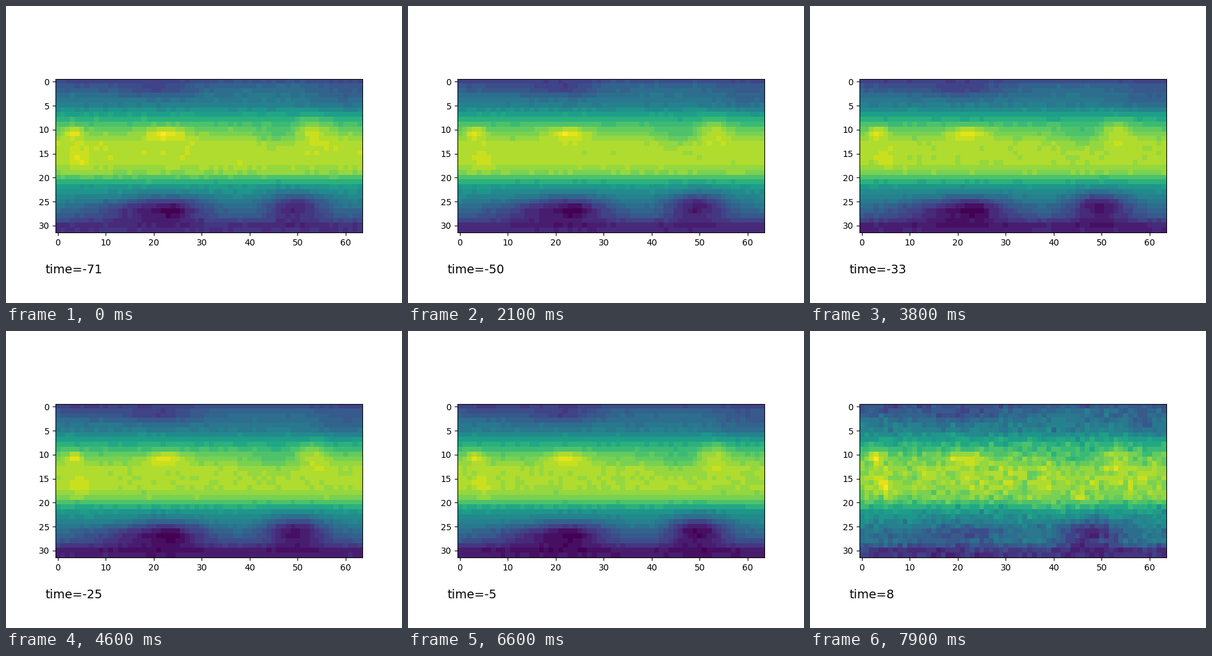
These frames come from a looping animation (640 px wide and 480 px high, 8 s). A matplotlib script:

```python
import numpy as np
import matplotlib.pyplot as plt
from matplotlib.animation import FuncAnimation

ROWS, COLS = 32, 64
FRAMES, STEP_MS, T0 = 80, 100, -71

rng = np.random.default_rng(12)
yy, xx = np.mgrid[0:ROWS, 0:COLS].astype(float)


def bump(cx, cy, sx, sy):
    return np.exp(-((xx - cx) / sx) ** 2 / 2 - ((yy - cy) / sy) ** 2 / 2)


def ramp(x, a, b):
    return np.clip((x - a) / (b - a), 0, 1)


# latitude profile: cool north, warm belt, cool south, polar edge
zonal = np.interp(yy, [0, 1, 5, 8, 10, 13, 17, 19, 22, 25, 28, 30],
                  [.27, .35, .44, .64, .76, .87, .87, .81, .55, .43, .31, .16])

north_cold = .15 * bump(21, 1.7, 6, 1.3) + .08 * bump(5, 1, 6, 1.3) + .08 * bump(60, 3, 5, 2.5)
hot_spots = .16 * bump(3.3, 10.8, 1.3, 1) + .17 * bump(22.5, 10.9, 3, 1) + .06 * bump(5, 16.5, 1.5, 1.5)
ridge = .12 * bump(53, 10, 2.3, 2) - .08 * bump(46, 11.5, 3.5, 1.6)
base = zonal - north_cold + hot_spots + ridge

west_low = .27 * bump(23, 26.4, 6, 2) + .10 * bump(13, 27, 6, 1.6)
west_core = .09 * bump(24, 27, 1.5, .8)
east_low = .27 * bump(49.5, 25.8, 4.5, 2.1)
polar = ramp(yy, 27, 30)

# the forecast moves the eastern low and warms its surroundings
moved_low = .31 * bump(47.5, 26.5, 4.5, 2.2)
thaw = .09 * bump(32, 28.3, 60, 1) + .05 * bump(30, 27.5, 4.5, 1.6) + .07 * bump(42, 21.5, 4, 1.5)
hot_cell = bump(45.6, 19.3, .8, .7)

grain, fixed = rng.normal(0, 1, (2, ROWS, COLS))
phase = rng.uniform(0, 2 * np.pi, (ROWS, COLS))
rate = rng.uniform(.3, 1.2, (ROWS, COLS))


def observed(t):
    trend = ramp(t, T0, -14)
    lows = west_low + west_core + (1 + .25 * trend) * east_low
    return base - lows - .05 * trend * polar - .02 * trend


def forecast(t):
    s = ramp(t, 1, 8)
    v = base - .55 * west_low - moved_low + thaw - .03 * polar
    v = .18 - .13 * s + (.64 + .26 * s) * v
    return v + (.22 - .11 * s) * hot_cell + (.042 - .01 * s) * grain


def field(t):
    wobble = .005 * fixed + .011 * np.sin(phase + rate * t)
    v = observed(t) if t < 1 else forecast(t)
    return np.clip(v + wobble, 0, 1)


fig, ax = plt.subplots(figsize=(6.4, 4.8), dpi=100)
image = ax.imshow(field(T0), cmap=plt.get_cmap("viridis", 26), vmin=0, vmax=1)
label = fig.text(.1, .1, "", fontsize=14)


def update(i):
    t = T0 + i
    image.set_data(field(t))
    label.set_text(f"time={t}")
    return image, label


anim = FuncAnimation(fig, update, frames=FRAMES, interval=STEP_MS,
                     repeat=True, repeat_delay=0, blit=False)
plt.show()
```
